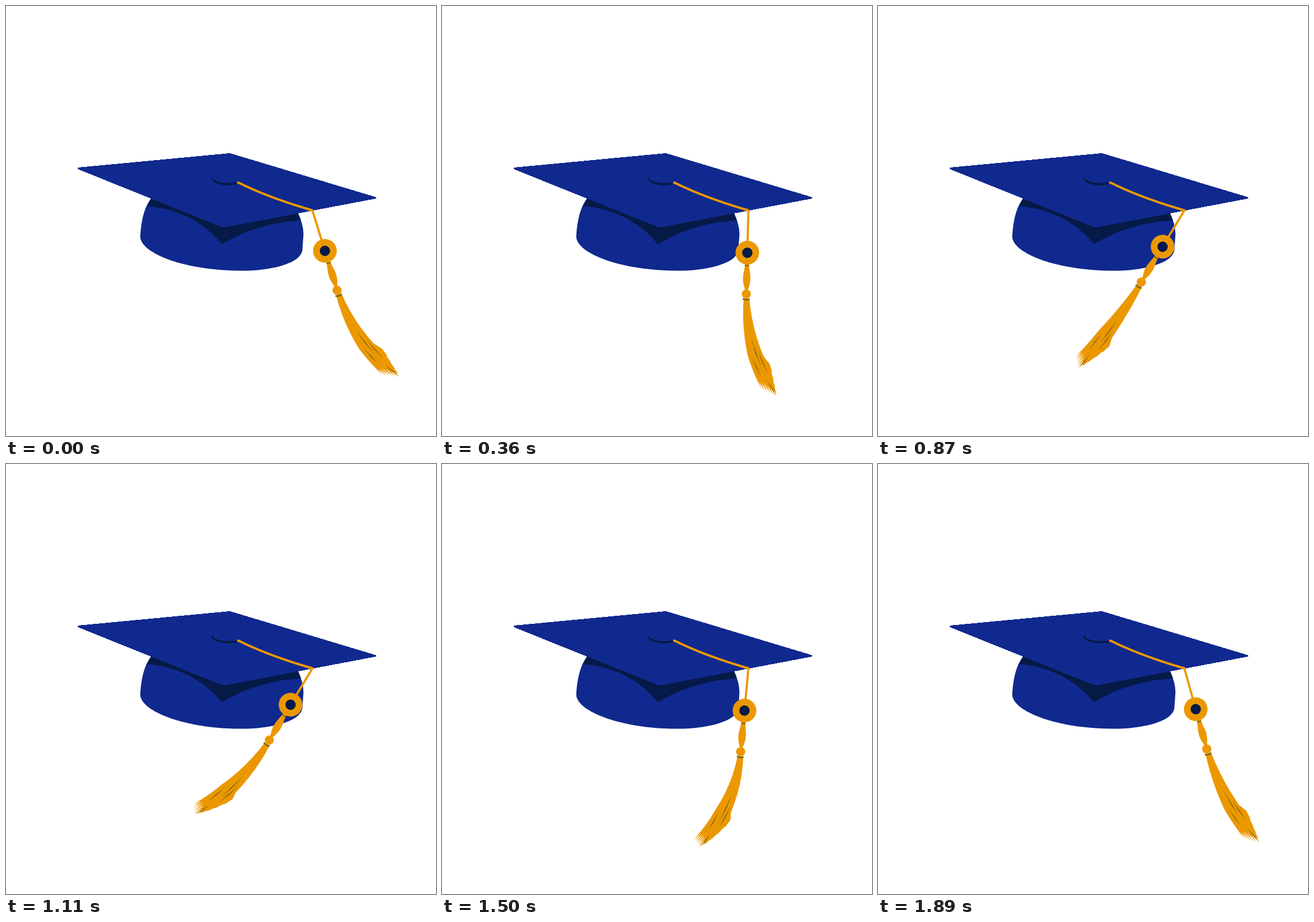
Animation of 748x748 px, one loop 1.92 s. Source, as an HTML page:

```html
<!DOCTYPE html>
<html>
<head>
<meta charset="utf-8">
<title>Graduation cap</title>
<style>
  html, body { margin: 0; width: 100%; height: 100%; overflow: hidden; background: #fff; }
  svg { display: block; width: 748px; height: 748px; }
</style>
</head>
<body>
<svg viewBox="0 0 748 748">
  <path fill="#10298e" d="M253 334C240 350 235 375 233.500 402C236 431 312 461 412 460.500C470 460 513 445 515.500 425L517.500 397Q517 378 507 358L378 380Z"/>
  <path fill="#051a46" d="M253 334L245.500 348C300 352 350 380 375 414.500C410 393 460 375 513 373L507 358L378 380Z"/>
  <path fill="#10298e" shape-rendering="crispEdges" d="M125 281L389.500 256L643.500 332.500V335L378 385.500L125.500 284Z"/>
  <path fill="#051a46" d="M359 297C353 304 367 312 390 312L404 310V306.500C382 311 357 305 359 297Z"/>
  <path fill="none" stroke="#eb9800" stroke-width="4" stroke-linejoin="round" d="M402 307.500H405C440 325 490 343 533 355.500"/>
  <g id="cord" fill="#eb9800">
    <path d="M0 0V60" stroke="#eb9800" stroke-width="3.800" stroke-linecap="round"/>
    <path d="M-3.500 93C-4 104 -6.500 108 -6.500 119C-6.500 128 -3 134 -2 140H2C4 134 6.500 128 6.500 118C6.500 108 3.500 104 3.500 93Z"/>
    <path d="M-3.700 95.500Q0 97 3.700 95.500" fill="none" stroke="#8a6a10" stroke-width="2.500"/>
    <circle cy="73.700" r="20.600"/>
    <circle cy="73.700" r="9" fill="#051a46"/>
  </g>
  <path id="tail" fill="#eb9800"/>
  <path id="streaks" fill="#8a6a10"/>
  <g id="knot">
    <path d="M-5.800 154Q0 157 5.800 154" fill="none" stroke="#8a6a10" stroke-width="3"/>
    <circle cy="145.500" r="8" fill="#eb9800"/>
  </g>
</svg>
<script>
const $ = id => document.getElementById(id);
const RAD = Math.PI / 180, LOOP = 1920, STEP = 30;
const PIVOT = [533, 355.5], KNOT = 145.5, LENGTH = 187;

const mix = (a, b, x) => a + (b - a) * x;
const part = (t, start, length) => Math.max(0, Math.min(1, (t - start) / length));
const snap = x => x * x * x * (x * (6 * x - 15) + 10);
const sway = x => (1 - Math.cos(Math.PI * x)) / 2;

// Angles in degrees from straight down, right positive; the tassel lags the cord.
const cordAngle = t =>
  mix(mix(17.2, -31, snap(part(t, 0, 820))), 15.5, snap(part(t, 1117, 725)));
const tasselAngle = t =>
  mix(mix(36, -45, sway(part(t, 0, 1110))), 60, sway(part(t, 1155, 1150)));

// Resting tassel points: [distance below the knot, sideways offset]
function fringe(count) {
  const points = [[8, -4.5], [110, -12]];
  for (let i = 0; i < count; i++) {
    const u = i / (count - 1), w = mix(-11.5, 18, u);
    const tip = u < 0.6 ? mix(172, 188, u / 0.6) : mix(188, 139, (u - 0.6) / 0.4);
    const notch = tip - 14 - 5 * Math.sin(i * 7);
    points.push([tip, w], [notch, w + 1.5]);
  }
  return [...points, [110, 14], [8, 5.5]];
}

const streak = (s, w, length) =>
  [[s, w], [s + length / 2, w], [s + length, w + 2], [s + length / 2, w + 2]];

const TAIL = fringe(10);
const STREAKS = [streak(78, 2, 52), streak(98, 8, 44), streak(112, -5, 38), streak(156, 4, 28)];

// Returns a function that bends a resting tassel point along an arc.
function bender(cord, tassel) {
  const a = cord * RAD, k = 2 * (tassel - cord - 2) * RAD / LENGTH || 1e-6;
  const kx = PIVOT[0] + KNOT * Math.sin(a), ky = PIVOT[1] + KNOT * Math.cos(a);
  return ([s, w]) => {
    const th = a + k * (s + w * k * s);
    const x = kx + (Math.cos(a) - Math.cos(th)) / k + w * Math.cos(th);
    const y = ky + (Math.sin(th) - Math.sin(a)) / k - w * Math.sin(th);
    return x.toFixed(2) + ' ' + y.toFixed(2);
  };
}

function outline(points, bend) {
  const out = [], N = 6;
  points.forEach((p, i) => {
    const q = points[(i + 1) % points.length];
    for (let j = 0; j < N; j++)
      out.push(bend([mix(p[0], q[0], j / N), mix(p[1], q[1], j / N)]));
  });
  return 'M' + out.join('L') + 'Z';
}

function draw(now) {
  const t = Math.floor(now % LOOP / STEP) * STEP;
  const cord = cordAngle(t), bend = bender(cord, tasselAngle(t));
  for (const id of ['cord', 'knot'])
    $(id).setAttribute('transform', `translate(${PIVOT}) rotate(${-cord})`);
  $('tail').setAttribute('d', outline(TAIL, bend));
  $('streaks').setAttribute('d', STREAKS.map(s => outline(s, bend)).join(''));
}

const start = performance.now();
function tick() {
  draw(performance.now() - start);
  requestAnimationFrame(tick);
}
tick();
</script>
</body>
</html>
```
